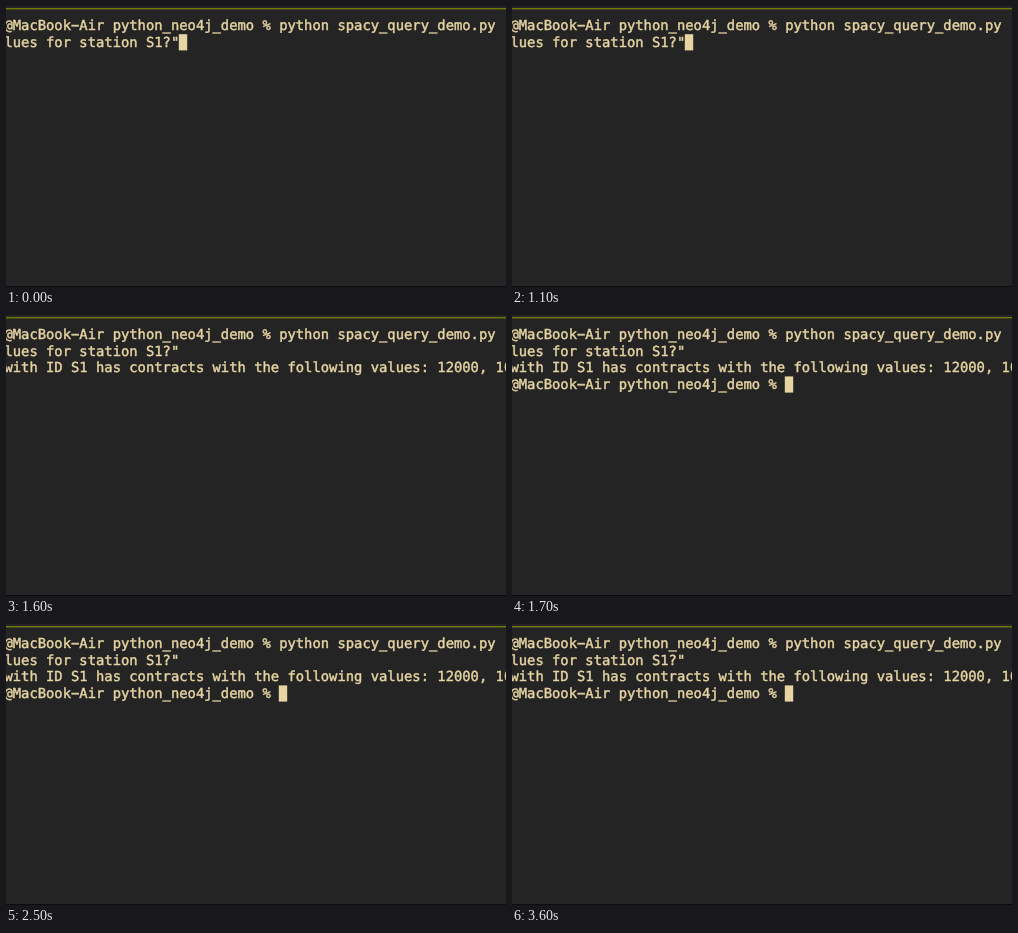
Recreate the animation shown at these times as an HTML page. Size 500 by 281 pixels, loop 3.8 s.

```html
<!DOCTYPE html>
<html lang="en">
<head>
<meta charset="utf-8">
<title>Terminal</title>
<style>
  html, body { margin: 0; height: 100%; overflow: hidden; background: #242424; }
  svg { display: block; width: 500px; height: 281px; }
  text {
    font: 13.84px "DejaVu Sans Mono", monospace;
    fill: #e6d4a3;
    stroke: #e6d4a3;
    stroke-width: .45px;
    white-space: pre;
    text-rendering: geometricPrecision;
  }
</style>
</head>
<body>
<svg viewBox="0 0 500 281">
  <rect width="500" height="281" fill="#242424"/>
  <rect y="2" width="500" height="1.4" fill="#727800"/>
  <rect y="280" width="500" height="1" fill="#0c0c0c"/>
  <text x="-1.6" y="24">@MacBook−Air python_neo4j_demo % python spacy_query_demo.py "</text>
  <text x="-1.6" y="41">lues for station S1?"</text>
  <text id="answer" x="-1.6" y="57">with ID S1 has contracts with the following values: 12000, 10000</text>
  <text id="prompt" x="-1.6" y="74">@MacBook−Air python_neo4j_demo % </text>
  <rect id="cursor" width="8.4" height="16.2" fill="#e6d4a3"/>
</svg>
<script>
  const LOOP = 3800, ENTER = 1500, ANSWER = 1600, PROMPT = 1700;
  const [answer, prompt, cursor] =
    ["answer", "prompt", "cursor"].map(id => document.getElementById(id));
  const show = (node, on) => node.setAttribute("visibility", on ? "visible" : "hidden");

  function draw(now) {
    const t = now % LOOP, done = t >= PROMPT;
    show(answer, t >= ANSWER);
    show(prompt, done);
    show(cursor, t < ENTER || done);
    cursor.setAttribute("x", done ? 272.8 : 172.8);
    cursor.setAttribute("y", done ? 61.4 : 28.2);
    requestAnimationFrame(draw);
  }
  draw(0);
</script>
</body>
</html>
```
